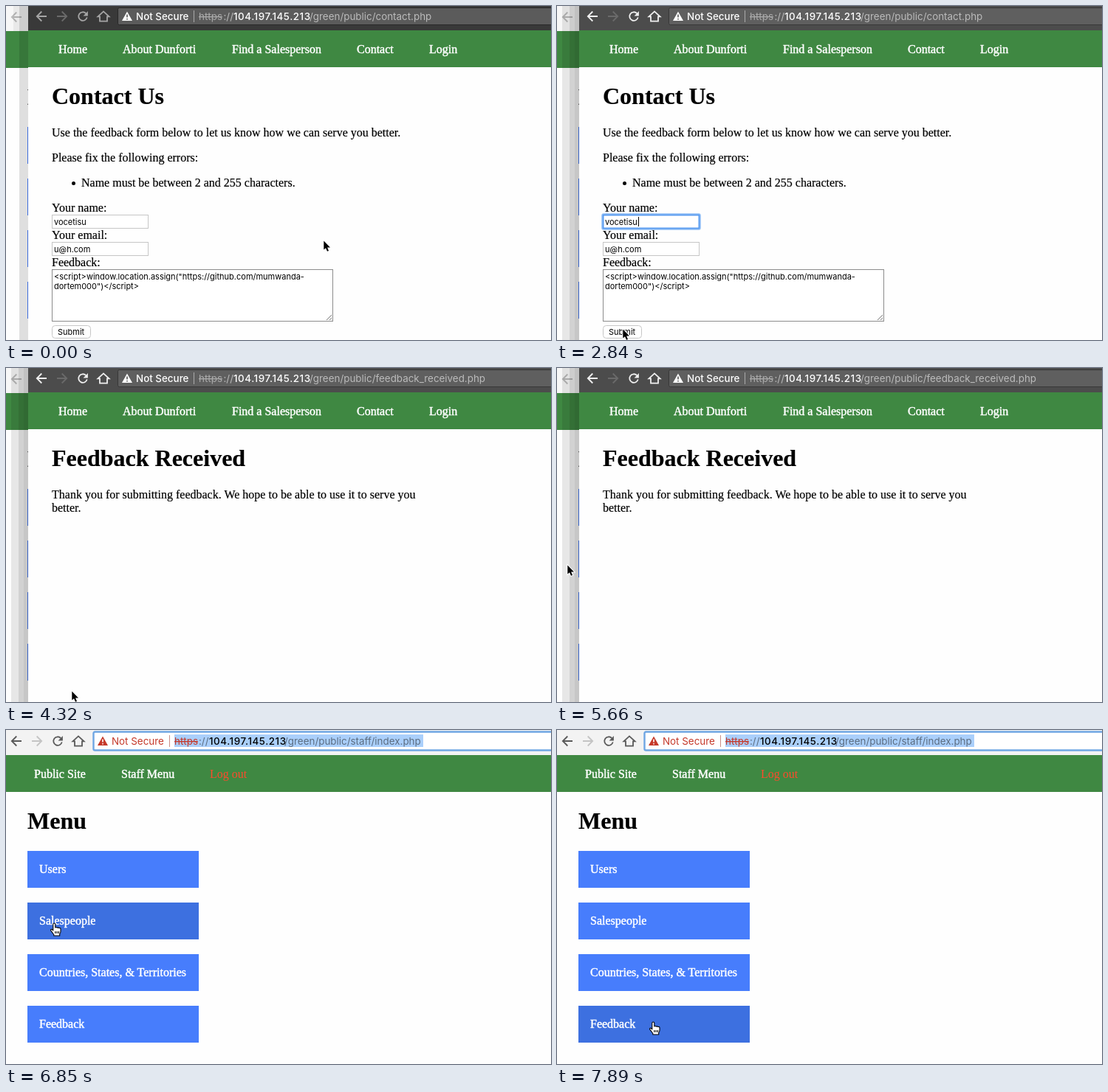
Animation, 738 px wide and 453 px high, one loop 8 s. Source, as an HTML page:

```html
<!DOCTYPE html>
<html lang="en">
<head>
<meta charset="utf-8">
<title>Feedback form</title>
<style>
html, body { margin: 0; width: 100%; height: 100%; overflow: hidden; background: #fefefe; }
svg { display: block; width: 738px; height: 453px; }
text {
  font: 16px "Liberation Serif", Times, serif;
  font-variant-ligatures: none;
  stroke: #000; stroke-width: .2px;
}
.h1 { font-size: 32px; font-weight: bold; }
.nav text, .menu text { fill: #fff; stroke: #fff; stroke-width: .45px; }
.nav .out { fill: #ff4a2c; stroke: none; }
.url text { font: 13.4px Inter, Roboto, sans-serif; stroke: none; }
.url .note { font-weight: 500; }
.url .host { font-weight: 500; letter-spacing: .55px; }
.field text { font: 11px Inter, Roboto, sans-serif; stroke: none; }
.strike { text-decoration: line-through; }
.icon { fill: none; stroke: currentColor; stroke-width: 1.8; }
.field rect { fill: #fff; stroke: #c6c6c6; }
.menu rect { fill: #477dfc; }

/* Every part holds its pose until the next key. */
.anim, .anim * { animation: 8s step-end infinite; }
#front { animation-name: front; }
#active { animation-name: active; }
#idle { animation-name: idle; }
#tools { animation-name: tools; }
#contact { animation-name: contact; }
#received { animation-name: received; }
#focus { animation-name: focus; }
#caret { animation-name: caret; }
#reload { animation-name: reload; }
#stop { animation-name: stop; }
#sales { animation-name: sales; }
#countries { animation-name: countries; }
#feedback { animation-name: feedback; }
#cursor { animation-name: move; }
#arrow { animation-name: arrow; }
#hand { animation-name: hand; }

@keyframes front { 0% { opacity: 1 } 78.25%, to { opacity: 0 } }
@keyframes active { 0% { opacity: 0 } 35.5%, to { opacity: 1 } }
@keyframes idle { 0% { opacity: 1 } 35.5%, to { opacity: 0 } }
@keyframes tools { 0% { color: #a6a6a6 } 35.5%, to { color: #f0f0f0 } }
@keyframes contact { 0% { opacity: 1 } 52.25%, to { opacity: 0 } }
@keyframes received { 0% { opacity: 0 } 52.25%, to { opacity: 1 } }
@keyframes focus { 0% { opacity: 0 } 35.5% { opacity: 1 } 46.625%, to { opacity: 0 } }
@keyframes caret { 0% { opacity: 0 } 35.5% { opacity: 1 } 41.125%, to { opacity: 0 } }
@keyframes reload { 0% { opacity: 1 } 46.625% { opacity: 0 } 54%, to { opacity: 1 } }
@keyframes stop { 0% { opacity: 0 } 46.625% { opacity: 1 } 54%, to { opacity: 0 } }
@keyframes sales {
  0% { fill: #477dfc } 85.625% { fill: #3d70e0 } 89.34% { fill: #477dfc }
  93.05% { fill: #3d70e0 } 94.9%, to { fill: #477dfc }
}
@keyframes countries { 0% { fill: #477dfc } 94.9% { fill: #3d70e0 } 96.76%, to { fill: #477dfc } }
@keyframes feedback { 0% { fill: #477dfc } 96.76%, to { fill: #3d70e0 } }
@keyframes arrow {
  0% { opacity: 1 } 85.625% { opacity: 0 } 89.34% { opacity: 1 } 93.05%, to { opacity: 0 }
}
@keyframes hand {
  0% { opacity: 0 } 85.625% { opacity: 1 } 89.34% { opacity: 0 } 93.05%, to { opacity: 1 }
}
@keyframes move {
  0% { transform: translate(430px, 318px) }
  1.875% { transform: translate(345px, 348px) }
  3.71% { transform: translate(190px, 403px) }
  5.54% { transform: translate(108px, 431px) }
  7.375% { transform: translate(88px, 438px) }
  11.125% { transform: translate(89px, 438px) }
  63.375% { transform: translate(84px, 428px) }
  65.22% { transform: translate(62px, 380px) }
  67.06% { transform: translate(36px, 318px) }
  68.91% { transform: translate(19px, 277px) }
  70.75% { transform: translate(14px, 267px) }
  85.625% { transform: translate(66px, 262px) }
  87.475% { transform: translate(78px, 243px) }
  89.34% { transform: translate(98px, 222px) }
  91.19% { transform: translate(118px, 216px) }
  93.05% { transform: translate(136px, 248px) }
  94.9% { transform: translate(140px, 318px) }
  96.76% { transform: translate(134px, 382px) }
  98.625%, to { transform: translate(131px, 396px) }
}
</style>
</head>
<body>
<svg viewBox="0 0 738 453" class="anim">
  <defs>
    <path id="back" class="icon" d="M7 0H-6M.3-6.5L-6.2 0 .3 6.5"/>
    <path id="forward" class="icon" d="M-7 0H6M-.3-6.5L6.2 0-.3 6.5"/>
    <g id="again">
      <path class="icon" d="M4.2-4A5.8 5.8 0 1 0 5.7 1.4"/>
      <path fill="currentColor" d="M6.9-6.9V-.6H.6Z"/>
    </g>
    <path id="home" class="icon" d="M-7.6.4L0-6.6 7.6.4H5V6.6H-5V.4Z"/>
    <g id="warn">
      <path fill="currentColor" stroke="none" d="M0-6.5L7 6H-7Z"/>
      <path stroke-width="1.6" d="M0-2.6V1.6M0 2.9V4.5"/>
    </g>
  </defs>

  <!-- Staff window -->
  <rect width="738" height="453" fill="#fefefe"/>
  <rect width="738" height="34" fill="#f3f3f3"/>
  <g color="#5a5a5a">
    <use href="#back" x="14" y="15"/>
    <use href="#forward" x="42" y="15" color="#c4c4c4"/>
    <use href="#again" x="70" y="15"/>
    <use href="#home" x="98" y="15"/>
  </g>
  <rect x="118.5" y="2.5" width="640" height="25" rx="2" fill="#fff" stroke="#6fa6e3" stroke-width="2.4"/>
  <rect x="228" y="6" width="337" height="17" fill="#aacffb"/>
  <use href="#warn" x="131" y="15" color="#c5392a" stroke="#fff"/>
  <path d="M221.5 7V23" stroke="#c98f89"/>
  <g class="url">
    <text x="143" y="20" fill="#c5392a">Not Secure</text>
    <text x="228" y="20" fill="#c5392a" class="strike">https</text>
    <text x="261" y="20" fill="#5c6d80">://</text>
    <text x="275" y="20" class="host">104.197.145.213</text>
    <text x="377" y="20" fill="#5c6d80">/green/public/staff/index.php</text>
  </g>
  <rect y="34" width="738" height="50" fill="#3f8842"/>
  <g class="nav">
    <text x="38" y="65">Public Site</text>
    <text x="156" y="65">Staff Menu</text>
    <text x="276" y="65" class="out">Log out</text>
  </g>
  <text x="29" y="134" class="h1">Menu</text>
  <g class="menu">
    <rect x="29" y="164" width="232" height="50"/>
    <rect id="sales" x="29" y="234" width="232" height="50"/>
    <rect id="countries" x="29" y="304" width="232" height="50"/>
    <rect id="feedback" x="29" y="374" width="232" height="50"/>
    <text x="45" y="194">Users</text>
    <text x="45" y="264">Salespeople</text>
    <text x="45" y="334">Countries, States, &amp; Territories</text>
    <text x="45" y="404">Feedback</text>
  </g>

  <!-- Private window, over the right part of the staff window -->
  <g id="front">
    <rect width="30" height="34" fill="#fafafa" opacity=".6"/>
    <g id="idle">
      <rect x="18" width="12" height="453" opacity=".12"/>
      <rect x="10" width="20" height="34" opacity=".06"/>
      <rect x="30" width="708" height="33" fill="#393939"/>
      <rect x="151.5" y="2.5" width="600" height="23" rx="2" fill="#5b5b5b" stroke="#282828"/>
    </g>
    <g id="active">
      <rect x="7" width="23" height="453" opacity=".09"/>
      <rect x="17" width="13" height="453" opacity=".09"/>
      <rect x="24" width="6" height="453" opacity=".05"/>
      <rect x="30" width="708" height="33" fill="#4c4c4c"/>
      <rect x="151.5" y="2.5" width="600" height="23" rx="2" fill="#5f5f5f" stroke="#383838"/>
    </g>
    <g id="tools">
      <use href="#back" x="48" y="14"/>
      <use href="#forward" x="76" y="14" color="#6a6a6a"/>
      <use id="reload" href="#again" x="104" y="14"/>
      <path id="stop" class="icon" d="M98.5 8.5L109.5 19.5M109.5 8.5L98.5 19.5"/>
      <use href="#home" x="132" y="14"/>
      <use href="#warn" x="164" y="14" color="#fff" stroke="#555"/>
    </g>
    <path d="M254.5 6V22" stroke="#aaa"/>
    <g class="url" fill="#fff">
      <text x="176" y="19" class="note">Not Secure</text>
      <text x="261" y="19" fill="#aaa" class="strike">https</text>
      <text x="294.5" y="19" fill="#bbb">://</text>
      <text x="308" y="19" class="host">104.197.145.213</text>
    </g>
    <rect x="30" y="33" width="708" height="50" fill="#3f8842"/>
    <rect x="30" y="83" width="708" height="370" fill="#fefefe"/>
    <g class="nav">
      <text x="71" y="64">Home</text>
      <text x="158" y="64">About Dunforti</text>
      <text x="306" y="64">Find a Salesperson</text>
      <text x="475" y="64">Contact</text>
      <text x="573" y="64">Login</text>
    </g>

    <g id="contact">
      <g class="url"><text x="411" y="19" fill="#bbb">/green/public/contact.php</text></g>
      <text x="62" y="133" class="h1">Contact Us</text>
      <text x="62" y="177">Use the feedback form below to let us know how we can serve you better.</text>
      <text x="62" y="211">Please fix the following errors:</text>
      <circle cx="91.5" cy="240.5" r="2.5"/>
      <text x="102" y="245">Name must be between 2 and 255 characters.</text>
      <text x="62" y="279">Your name:</text>
      <text x="62" y="316">Your email:</text>
      <text x="62" y="353">Feedback:</text>
      <g class="field">
        <rect x="62.5" y="283.5" width="130" height="18"/>
        <g id="focus">
          <rect x="61.5" y="282.5" width="132" height="20" rx="2" style="stroke:#a9cdf8;stroke-width:3"/>
          <rect x="62.5" y="283.5" width="130" height="18" style="stroke:#5a9cf0;stroke-width:2"/>
        </g>
        <text x="65" y="297">vocetisu</text>
        <path id="caret" d="M110.5 286V299" stroke="#000"/>
        <rect x="62.5" y="320.5" width="130" height="18"/>
        <text x="65" y="334">u@h.com</text>
        <rect x="62.5" y="357.5" width="380" height="70" style="stroke:#8c8c8c"/>
        <text x="65" y="371">&lt;script&gt;window.location.assign("https://github.com/mumwanda-</text>
        <text x="65" y="384">dortem000")&lt;/script&gt;</text>
        <path d="M434 426L441 419M438 426L441 423" stroke="#777"/>
        <rect x="62.5" y="433.5" width="52" height="17" rx="4"/>
        <text x="70" y="446">Submit</text>
      </g>
    </g>

    <g id="received">
      <g class="url"><text x="411" y="19" fill="#bbb">/green/public/feedback_received.php</text></g>
      <text x="62" y="133" class="h1">Feedback Received</text>
      <text x="62" y="177">Thank you for submitting feedback. We hope to be able to use it to serve you</text>
      <text x="62" y="195">better.</text>
    </g>
  </g>

  <g id="cursor">
    <path id="arrow" d="M.3.6V12.6L3 10.2 5 14.8 7 14 5.1 9.5H9Z" stroke="#fff" stroke-width="2" paint-order="stroke"/>
    <g id="hand" stroke="#000" stroke-width="1.1" stroke-linejoin="round">
      <path fill="#fff" d="M-2.2 1.5a1.5 1.5 0 0 1 3 0V6q1.3-1 2.5.2 1.4-.8 2.5.4 1.8-.6 2.2 1.2V11q0 2-1.3 3.5V17H-1.2V15.5L-5 10.4q-1-1.7.4-2.2 1.2 0 2.4 1.8Z"/>
      <path d="M.8 11V14M3.1 11V14M5.4 11V14"/>
    </g>
  </g>
</svg>
</body>
</html>
```
